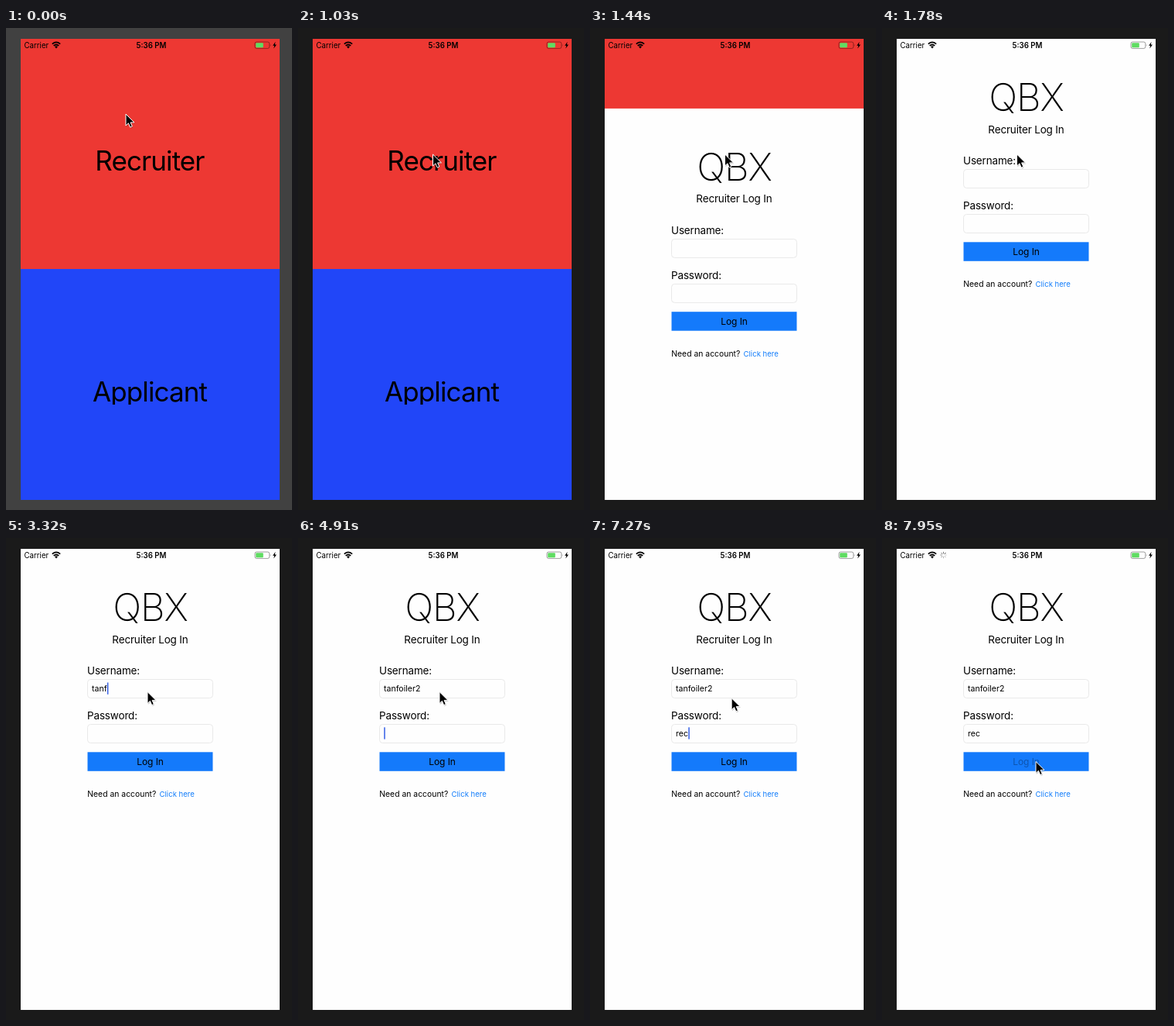
An HTML page that plays this animation: 370x622 px, repeating every 8000 ms.

```html
<!DOCTYPE html>
<html lang="en">
<head>
<meta charset="utf-8">
<title>Log in demo</title>
<style>
  html, body { margin: 0; width: 100%; height: 100%; overflow: hidden; background: #1a1a1a; }
  svg { display: block; width: 370px; height: 622px; }
  text { font-family: Inter, "Open Sans", sans-serif; font-optical-sizing: none; white-space: pre; }
  .mid { text-anchor: middle; }
  .role { font-size: 35px; letter-spacing: -.026em; }
  .logo { font-size: 49px; font-weight: 200; letter-spacing: -.022em; }
  .label { font-size: 13.5px; letter-spacing: -.012em; }
  .button { font-size: 12px; letter-spacing: -.005em; }
  .note { font-size: 10.4px; }
  .link { font-size: 9.6px; fill: #147efb; }
  .entry { font-size: 10.6px; }
  .status { font-size: 9.7px; }
  .field { fill: #fefefe; stroke: #e9e9e9; }
  .caret { fill: #4169e8; }
</style>
</head>
<body>
<svg viewBox="0 0 370 622">
  <defs>
    <clipPath id="screen"><rect x="19" y="14" width="335" height="595"/></clipPath>
    <clipPath id="labelBox"><rect x="100" y="445" width="172" height="41"/></clipPath>
  </defs>
  <rect id="desk" width="370" height="622"/>

  <g clip-path="url(#screen)">
    <rect x="19" y="14" width="335" height="297" fill="#ed3833"/>
    <rect x="19" y="311" width="335" height="298" fill="#2146f8"/>
    <text class="mid role" x="186" y="184">Recruiter</text>
    <g clip-path="url(#labelBox)"><text class="mid role" x="186" y="482">Applicant</text></g>

    <g id="sheet">
      <rect x="19" y="14" width="335" height="600" fill="#fefefe"/>
      <text class="mid logo" x="186.5" y="107">QBX</text>
      <text class="mid label" x="186.5" y="135.5">Recruiter Log In</text>
      <text class="label" x="105" y="176">Username:</text>
      <rect class="field" x="105.5" y="182.5" width="162" height="24" rx="4"/>
      <text class="label" x="105" y="233.7">Password:</text>
      <rect class="field" x="105.5" y="240.5" width="162" height="24" rx="4"/>
      <text class="entry" id="userText" x="111" y="198"></text>
      <rect class="caret" id="userCaret" y="186.5" width="1.6" height="15.3"/>
      <text class="entry" id="passText" x="111" y="255.8"></text>
      <rect class="caret" id="passCaret" y="244.3" width="1.6" height="15.3"/>
      <rect x="105.5" y="276.3" width="162" height="24.5" fill="#147afb"/>
      <text class="mid button" id="buttonText" x="186.5" y="293.2">Log In</text>
      <text class="note" x="105.2" y="334">Need an account?</text>
      <text class="link" x="198.5" y="333.7">Click here</text>
    </g>
  </g>

  <text class="status" x="23.5" y="25.8">Carrier</text>
  <text class="mid status" x="188" y="25.8" font-weight="600">5:36 PM</text>
  <g fill="none" stroke="#000" stroke-width="1.7">
    <path d="M59.8 20.6Q65 16.2 70.2 20.6"/>
    <path d="M61.7 22.9Q65 20.1 68.3 22.9"/>
    <path d="M63 24.1Q65 22.6 67 24.1L65 26.4Z" fill="#000" stroke="none"/>
  </g>
  <rect x="322" y="18" width="18.8" height="8.4" rx="2.2" fill="none" stroke="#000" stroke-opacity=".42" stroke-width=".9"/>
  <path d="M341.8 20.7q1.4 1.5 0 3z" fill="#000" fill-opacity=".45"/>
  <rect x="323.2" y="19.2" width="9.6" height="6" rx="1" fill="#5fdc62"/>
  <path d="M348.6 17.8l-3.5 5h2.1l-.9 3.7 3.7-5.1h-2.2z"/>
  <g id="spinner" stroke="#555" stroke-width="1" stroke-linecap="round"></g>

  <g id="pointer">
    <path d="M.8 1.6V16.6l3.4-3.2 2.3 5.2 2.6-1.1-2.2-5.1h5z" fill="#000" opacity=".18"/>
    <path d="M0 0V15l3.4-3.2 2.3 5.3 2.6-1.1-2.2-5.1h4.9z" fill="#000" stroke="#fff" stroke-width="1"/>
  </g>
</svg>
<script>
const LOOP = 8000;
const $ = id => document.getElementById(id);

// Step tables: [time, value], each value holds until the next entry.
const DESK = [[0, '#414141'], [1030, '#1a1a1a']];
const USER_KEYS = [2670, 2900, 3080, 3320, 3490, 3550, 3790, 3910, 4080, 4620];
const PASS_KEYS = [6860, 7030, 7200];
const USER_CARET = [[0, 0], [2370, 1], [4910, 0]];
const PASS_CARET = [[0, 0], [4910, 1], [5500, .66], [5560, .33], [5620, 0], [5980, .5], [6030, 1],
  [6450, .75], [6510, .5], [6560, .25], [6620, 0], [6860, 1], [7840, 0]];
const BUTTON = [[0, 1], [7840, .2], [7890, .25], [7950, .3]];

// Pointer moves: start, end, first and last drawn step, step count, from, to, sideways power.
const MOVES = [
  { start: 10, end: 680, first: 60, steps: 11, from: [155, 111], to: [174.5, 163], bend: 1 },
  { start: 1790, end: 2130, first: 1845, steps: 5, from: [174.5, 163], to: [183, 198.5], bend: 1 },
  { start: 7150, end: 7780, first: 7210, steps: 10, from: [183, 198.5], to: [199, 288.5], bend: 2 },
];

const at = (table, t) => table.reduce((value, [time, next]) => t >= time ? next : value, table[0][1]);
const hold = (t, first, step) => first + Math.floor((t - first) / step + 1e-6) * step;
const smooth = u => u * u * (3 - 2 * u);
const clamp = u => Math.min(1, Math.max(0, u));

const spokes = Array.from({ length: 8 }, (_, i) => {
  const line = document.createElementNS('http://www.w3.org/2000/svg', 'path');
  line.setAttribute('d', 'M0-2.1V-3.8');
  line.setAttribute('transform', `translate(79.5 22) rotate(${i * 45})`);
  return $('spinner').appendChild(line);
});

function pointerAt(t) {
  const move = MOVES.filter(m => t >= m.first).pop();
  if (!move) return MOVES[0].from;
  const { start, end, first, steps, from, to, bend } = move;
  const p = smooth(clamp((hold(t, first, (end - first) / steps) - start) / (end - start)));
  return [from[0] + (to[0] - from[0]) * p ** bend, from[1] + (to[1] - from[1]) * p];
}

// Critically damped slide, drawn about every 55 ms.
function sheetOffset(t) {
  if (t < 1330) return 600;
  const x = 0.019 * (hold(t, 1330, 55) - 1263);
  const y = 595 * (1 + x) * Math.exp(-x);
  return y < .5 ? 0 : y;
}

function type(name, word, keys, caret, t) {
  const text = $(name + 'Text'), bar = $(name + 'Caret');
  const typed = word.slice(0, keys.filter(k => t >= k).length);
  if (text.textContent !== typed) text.textContent = typed;
  bar.setAttribute('x', 111.2 + (typed ? text.getComputedTextLength() : 0));
  bar.setAttribute('opacity', at(caret, t));
}

function draw(t) {
  $('desk').setAttribute('fill', at(DESK, t));
  $('sheet').setAttribute('transform', `translate(0 ${sheetOffset(t)})`);
  $('pointer').setAttribute('transform', `translate(${pointerAt(t)})`);
  $('buttonText').setAttribute('opacity', at(BUTTON, t));
  type('user', 'tanfoiler2', USER_KEYS, USER_CARET, t);
  type('pass', 'rec', PASS_KEYS, PASS_CARET, t);
  $('spinner').setAttribute('opacity', t >= 7840 ? 1 : 0);
  const turn = Math.floor((t - 7840) / 55);
  spokes.forEach((s, i) => s.setAttribute('opacity', .25 + .09 * ((((i - turn) % 8) + 8) % 8)));
}

const begin = performance.now();
function tick() {
  draw((performance.now() - begin) % LOOP);
  requestAnimationFrame(tick);
}
tick();
</script>
</body>
</html>
```
